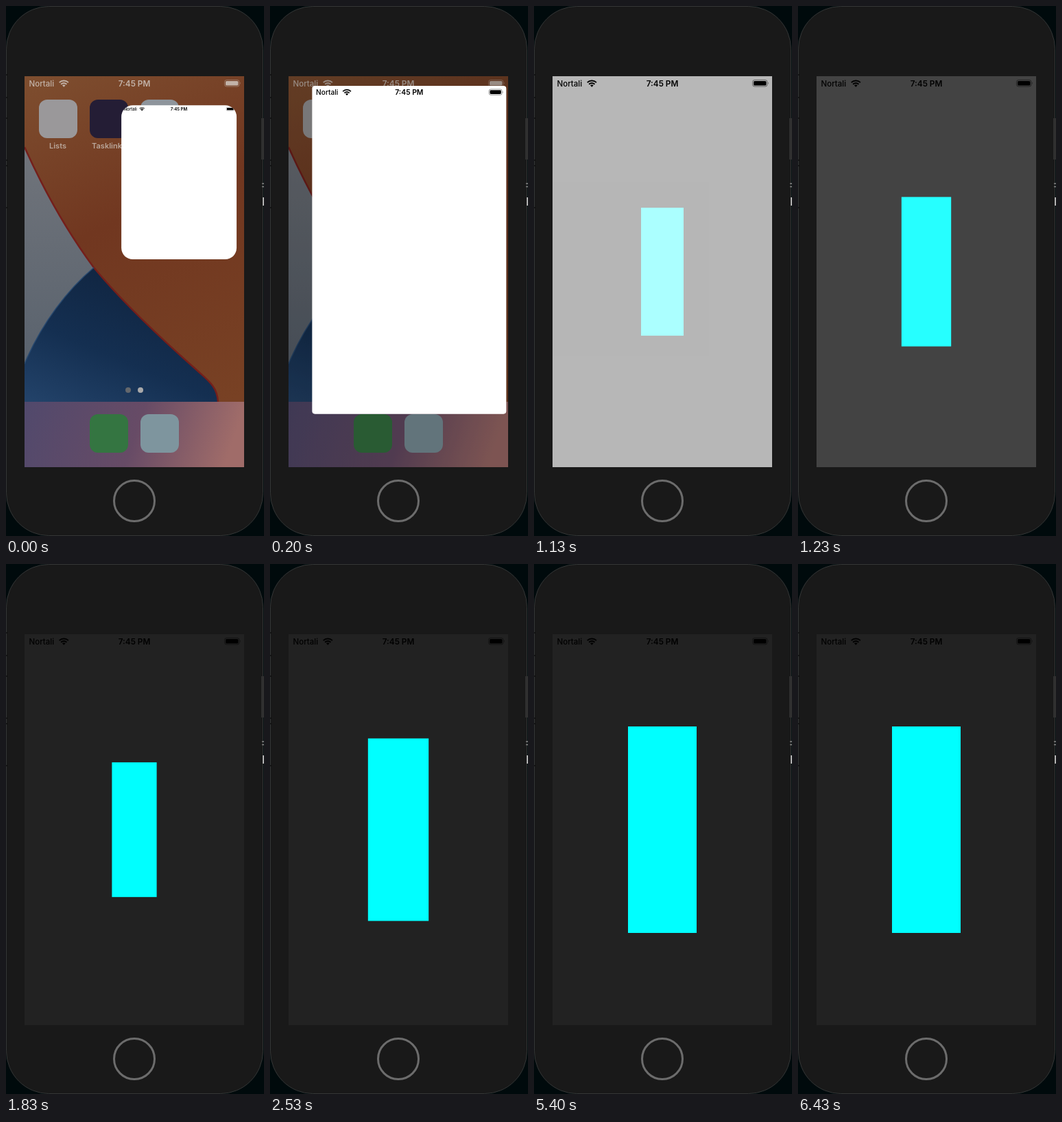
An HTML page for the animation above (6.46 s loop, 376 by 770 pixels).

```html
<!DOCTYPE html>
<html lang="en">
<head>
<meta charset="utf-8">
<title>App launch</title>
<style>
  html, body { margin: 0; width: 100%; height: 100%; overflow: hidden; background: #000a0c; }
  svg { display: block; width: 376px; height: 770px; }
  text { font-family: Inter, Roboto, sans-serif; }
  .label { font-size: 11px; font-weight: 600; text-anchor: middle; fill: #b9a69a; }
</style>
</head>
<body>
<svg viewBox="0 0 376 770">
  <defs>
    <linearGradient id="sand" x1="0" y1="0" x2=".25" y2="1">
      <stop offset="0" stop-color="#7e4e2f"/>
      <stop offset=".45" stop-color="#713720"/>
      <stop offset="1" stop-color="#784124"/>
    </linearGradient>
    <linearGradient id="mist" x1="0" y1="0" x2="0" y2="1">
      <stop offset="0" stop-color="#70747b"/>
      <stop offset="1" stop-color="#59626d"/>
    </linearGradient>
    <linearGradient id="sea" x1=".6" y1="0" x2="0" y2="1">
      <stop offset="0" stop-color="#10243f"/>
      <stop offset=".55" stop-color="#142f51"/>
      <stop offset="1" stop-color="#23436a"/>
    </linearGradient>
    <linearGradient id="dock" x1="0" y1="0" x2="1" y2=".1">
      <stop offset="0" stop-color="#51496c"/>
      <stop offset=".55" stop-color="#674b66"/>
      <stop offset="1" stop-color="#a06c69"/>
    </linearGradient>
    <clipPath id="screen"><rect width="320" height="568"/></clipPath>
    <clipPath id="frame"><rect id="frameRect"/></clipPath>
    <g id="status">
      <text x="6.5" y="14.5" font-size="11.5" font-weight="500" fill="currentColor">Nortali</text>
      <g fill="none" stroke="currentColor" stroke-width="2">
        <path d="M50.7 9.1a9.5 9.5 0 0 1 13.2 0M53.2 11.8a5.8 5.8 0 0 1 8.2 0"/>
      </g>
      <path d="M57.3 15.8l-2.3-2.5a3.3 3.3 0 0 1 4.6 0z" fill="currentColor"/>
      <text x="160" y="14.5" font-size="11.8" font-weight="600" text-anchor="middle" fill="currentColor">7:45 PM</text>
      <rect x="291.5" y="5.5" width="21.5" height="9.5" rx="3" fill="none" stroke="currentColor" opacity=".45"/>
      <rect x="293" y="7" width="18.5" height="6.5" rx="1.6" fill="currentColor"/>
      <path d="M314 8.6q1.6 1.6 0 3.2z" fill="currentColor" opacity=".5"/>
    </g>
  </defs>

  <!-- Device body -->
  <rect x=".5" y=".5" width="374" height="769" rx="62" fill="#191919" stroke="#343636"/>
  <path d="M0 100h2M0 133h2M0 163h2M0 224h2M0 232h2M0 293h2" stroke="#000"/>
  <rect x="372" y="163" width="4" height="60" fill="#303030"/>
  <path d="M373 258h3M373 262.5h3" stroke="#858585" stroke-width="1.5"/>
  <rect x="374" y="278" width="2" height="12" fill="#b0b0b0"/>
  <circle cx="187" cy="719" r="29.5" fill="#191919" stroke="#6c6c6c" stroke-width="3"/>

  <g transform="translate(27 102)" clip-path="url(#screen)">
    <g id="home">
      <rect width="320" height="568" fill="url(#sand)"/>
      <path d="M0 103C32 174 66 231 101 278L0 430z" fill="url(#mist)"/>
      <path d="M101 278C64 309 25 358 0 418V473H282C281 450 266 441 250 426C200 382 140 325 101 278z" fill="url(#sea)"/>
      <path d="M0 103C32 174 66 231 101 278C140 325 200 382 250 426C266 441 281 450 282 473" fill="none" stroke="#741f1b" stroke-width="2.5"/>
      <path d="M101 278C64 309 25 358 0 418" fill="none" stroke="#28496f" stroke-width="1.5"/>
      <rect y="473" width="320" height="95" fill="url(#dock)"/>
      <g id="icons"></g>
      <text class="label" x="48.5" y="105">Lists</text>
      <text class="label" x="123" y="105">Tasklinks</text>
      <circle cx="151" cy="456" r="4" fill="#64676c"/>
      <circle cx="169" cy="456" r="4" fill="#a9a9aa"/>
      <use href="#status" color="#c2b2a8"/>
      <rect id="shade" width="320" height="568"/>
    </g>
    <g clip-path="url(#frame)">
      <rect width="320" height="568" fill="#fff"/>
      <g id="page">
        <g id="view">
          <rect width="320" height="568" fill="#222"/>
          <rect id="bar" x="-50" y="-150" width="100" height="300" fill="#0ff"/>
        </g>
        <use href="#status" color="#000"/>
      </g>
    </g>
  </g>
</svg>
<script>
const LOOP = 6460;
const FPS = 30;
const GROWN = 0.424;
const FADE = { start: 1030, length: 270 };
const PULSE = { start: 926, half: 573, count: 4, low: 0.404 };

const $ = id => document.getElementById(id);
const clamp = v => Math.min(1, Math.max(0, v));
const mix = (a, b, p) => a + (b - a) * p;
const set = (node, attrs) => {
  for (const key in attrs) node.setAttribute(key, attrs[key]);
};

function addIcon(x, y, fill) {
  const tile = document.createElementNS($('icons').namespaceURI, 'rect');
  set(tile, { x, y, width: 56, height: 56, rx: 12, fill });
  $('icons').append(tile);
}

addIcon(21, 34, '#9a989a');
addIcon(95, 34, '#241d35');
addIcon(169, 34, '#8e959c');
addIcon(95, 491, '#347541');
addIcon(169, 491, '#7e959e');

// The window starts partly grown out of its icon and settles on the full screen.
function drawWindow(t) {
  const s = t / 1000;
  const p = t > 700 ? 1 : 1 - (1 - GROWN) * (1 + 4 * s) * Math.exp(-10 * s);
  const width = mix(56, 320, p);
  const height = mix(56, 568, p ** 1.3);
  const x = mix(273, 160, p) - width / 2;
  const y = mix(58.5, 284, p) - height / 2;
  set($('frameRect'), { x, y, width, height, rx: 29 * (1 - p) });
  set($('page'), { transform: `translate(${x} ${y}) scale(${width / 320})` });
  set($('shade'), { opacity: 0.5 * (p - GROWN) });
  set($('home'), { visibility: p === 1 ? 'hidden' : 'visible' });
}

function drawView(t) {
  const u = clamp((t - FADE.start) / FADE.length);
  set($('view'), { opacity: u * u * (3 - 2 * u) });

  // Grows and shrinks twice, then snaps to full size.
  const phase = Math.max(0, (t - PULSE.start) / PULSE.half);
  const up = 1 - Math.abs(phase % 2 - 1);
  const scale = phase >= PULSE.count ? 1 : mix(PULSE.low, 1, up);
  set($('bar'), { transform: `translate(160 284) scale(${scale})` });
}

function draw(now) {
  const t = Math.floor((now % LOOP + 4) * FPS / 1000) * 1000 / FPS;
  drawWindow(t);
  drawView(t);
}

const begin = performance.now();
function tick() {
  draw(performance.now() - begin);
  requestAnimationFrame(tick);
}
tick();
</script>
</body>
</html>
```
